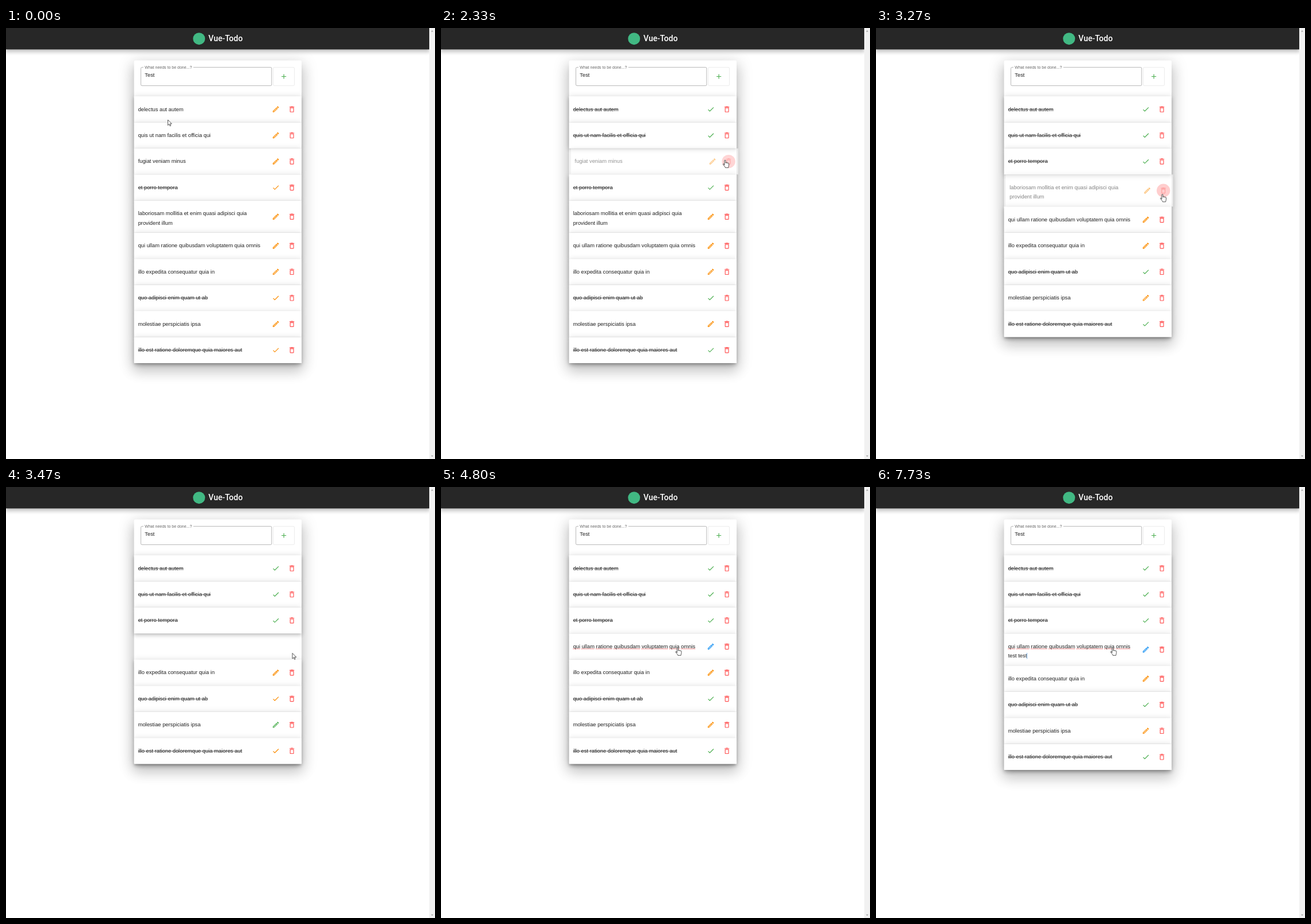
Recreate the animation shown at these times as an HTML page. Size 746 by 751 pixels, loop 8 s.

```html
<!DOCTYPE html>
<html lang="en">
<head>
<meta charset="utf-8">
<title>Vue-Todo</title>
<style>
html, body { margin: 0; width: 100%; height: 100%; overflow: hidden; background: #fff; }
#page {
  position: absolute; width: 1280px; height: 1289px; overflow: hidden;
  transform: scale(.58281); transform-origin: 0 0;
  font: 16px/28px Arial, "Liberation Sans", sans-serif; color: #212121;
}
#page * { box-sizing: border-box; }
main { position: absolute; width: 1263px; height: 100%; overflow: hidden; }
header {
  position: absolute; width: 100%; height: 64px; background: #272727;
  box-shadow: 0 5px 5px -3px #0003, 0 8px 10px 1px #00000024, 0 3px 14px 2px #0000001f;
}
header i { position: absolute; left: 558px; top: 14px; width: 36px; height: 36px; border-radius: 50%; background: #41b883; }
header b { position: absolute; left: 604px; top: 16px; font: 500 24px/32px Roboto, sans-serif; color: #fff; }
#card {
  position: absolute; left: 382px; top: 97px; width: 500px; padding-top: 107px;
  background: #fff; border-radius: 4px;
  box-shadow: 0 11px 15px -7px #0003, 0 24px 38px 3px #00000024, 0 9px 46px 8px #0000001f;
}
.field, .add { position: absolute; top: 20px; height: 56px; border-radius: 4px; }
.field { left: 20px; width: 391px; padding: 9px 11px; border: 1px solid #0000007a; }
.field label { position: absolute; left: 7px; top: -8px; padding: 0 4px; font-size: 12px; line-height: 16px; background: #fff; color: #0009; }
.add { left: 415px; width: 64px; padding: 15px 19px; border: 1px solid #ddd; fill: #4caf50; }
svg { display: block; }
.row {
  position: relative; min-height: 78px; padding: 25px 12px 15px; background: #fff;
  box-shadow: 0 3px 5px -1px #0003, 0 6px 10px #00000024, 0 1px 18px #0000001f;
}
.text { white-space: pre; }
.done { text-decoration: line-through; }
.text u { text-decoration: underline dotted 2px #f00b; text-underline-offset: 1px; text-decoration-skip-ink: none; }
.caret { display: inline-block; width: 1px; height: 18px; margin-right: -1px; vertical-align: -4px; background: #1976d2; }
.btn { position: absolute; top: 50%; width: 40px; height: 40px; margin-top: -20px; padding: 8px; border-radius: 50%; }
.state { left: 403px; }
.trash { left: 451px; fill: #ff5252; }
#bar { position: absolute; left: 1263px; width: 17px; height: 100%; background: #f1f1f1; }
#cursor { position: absolute; left: 0; top: 0; overflow: visible; fill: #fff; stroke: #111; stroke-width: 1.2; stroke-linejoin: round; }
</style>
</head>
<body>
<div id="page">
  <main>
    <div id="card">
      <div class="field"><label>What needs to be done...?</label><div style="margin-top:-1px">Test</div></div>
      <div class="add"><svg width="24" height="24"><path d="M19 13H13V19H11V13H5V11H11V5H13V11H19Z"/></svg></div>
      <div id="list"></div>
    </div>
    <header><i></i><b>Vue-Todo</b></header>
  </main>
  <svg id="bar" viewBox="0 0 17 1289" fill="#a3a3a3"><path d="M5 11H12L8.500 7ZM5 1278H12L8.500 1282Z"/></svg>
  <svg id="cursor" width="20" height="26"><path/></svg>
</div>
<script>
const LOOP = 8000, FPS = 15, SCALE = .58281;
const NEVER = Infinity;

const ICONS = {
  pencil: 'M14.06 9L15 9.94L5.92 19H5V18.08L14.06 9M17.66 3C17.41 3 17.15 3.1 16.96 3.29L15.13 5.12L18.88 8.87L20.71 7.04C21.1 6.65 21.1 6 20.71 5.63L18.37 3.29C18.17 3.09 17.92 3 17.66 3M14.06 6.19L3 17.25V21H6.75L17.81 9.94Z',
  check: 'M21 7L9 19L3.5 13.5L4.91 12.09L9 16.17L19.59 5.59Z',
  trash: 'M6 19A2 2 0 0 0 8 21H16A2 2 0 0 0 18 19V7H6V19M8 9H16V19H8V9M15.5 4L14.5 3H9.5L8.5 4H5V6H19V4Z'
};
const ARROW = 'M0 0V16.5L3.8 12.9L6.3 18.7L8.8 17.6L6.3 12H11.7Z';
const HAND = 'M-1.8 15V2.2a1.8 1.8 0 0 1 3.6 0V9a1.7 1.7 0 0 1 3.4 .4a1.6 1.6 0 0 1 3.2 .6a1.5 1.5 0 0 1 2.8 .9V16c0 3-1.5 4-1.5 7H.7C.7 20-3.8 17-5.8 13.5c-1-2 1.2-3 2.4-1.5Z';

const ORANGE = [251, 140, 0], GREEN = [76, 175, 80], BLUE = [33, 150, 243];
const INK = [33, 33, 33], HOVER_INK = [25, 95, 150];

const EDIT_AT = 4390, WRAP_AT = 5260;
const todos = [
  { text: 'delectus aut autem', doneAt: 400, hoverAt: 200 },
  { text: 'quis ut nam facilis et officia qui', doneAt: 1130, hoverAt: 700 },
  { text: 'fugiat veniam minus', goneAt: 2500 },
  { text: 'et porro tempora', doneAt: 0 },
  { text: 'laboriosam mollitia et enim quasi adipisci quia\nprovident illum', goneAt: 3460 },
  { text: 'qui ullam ratione quibusdam voluptatem quia omnis', editAt: EDIT_AT },
  { text: 'illo expedita consequatur quia in' },
  { text: 'quo adipisci enim quam ut ab', doneAt: 0 },
  { text: 'molestiae perspiciatis ipsa' },
  { text: 'illo est ratione doloremque quia maiores aut', doneAt: 0 }
].map(todo => ({ doneAt: NEVER, goneAt: NEVER, editAt: NEVER, hoverAt: NEVER, ...todo }));

const changes = [0, 400, 1130, 2500, 3460, EDIT_AT];
const removals = [{ index: 2, end: 2500 }, { index: 3, end: 3460 }];
const trashHovers = [{ index: 2, on: 1950, off: 2560 }, { index: 3, on: 2890, off: 3460 }];
const keyTimes = [6660, 6730, 6860, 6930, 7060, 7395, 7530, 7660, 7730];

// time, x, y of the pointer tip
const path = [
  [0, 281.5, 160], [250, 281, 146], [420, 281, 146], [800, 280, 185], [1270, 280, 185],
  [1930, 494, 230], [2530, 494, 230], [2800, 490, 293], [2930, 498, 289.5],
  [3750, 498, 289.5], [4250, 467, 278], [4530, 467, 278], [4800, 411.5, 280]
];
const handTimes = [[200, 480], [700, 1450], [1850, 2600], [2860, 3460], [4130, LOOP]];

const clamp = x => Math.max(0, Math.min(1, x));
const smooth = x => (x = clamp(x), x * x * (3 - 2 * x));
const lerp = (a, b, p) => a + (b - a) * p;
const mix = (a, b, p) => `rgb(${a.map((v, i) => Math.round(lerp(v, b[i], p)))})`;
const pulse = (t, on, off) => smooth((t - on) / 200) * (1 - smooth((t - off) / 200));
const within = (t, spans) => spans.some(([from, to]) => t >= from && t < to);

const list = document.getElementById('list');
const cursor = document.getElementById('cursor');
const icon = name => `<svg width="24" height="24"><path d="${ICONS[name]}"/></svg>`;

const rows = todos.map(() => {
  const el = document.createElement('div');
  el.className = 'row';
  el.innerHTML = `<div class="text"></div><div class="btn state">${icon('pencil')}</div><div class="btn trash">${icon('trash')}</div>`;
  list.append(el);
  const [text, state, trash] = el.children;
  return { el, text, state, trash, glyph: state.querySelector('path') };
});

const visible = t => todos.filter(todo => t < todo.goneAt);
const tint = (todo, t) => t >= todo.doneAt ? GREEN : t >= todo.editAt ? BLUE : ORANGE;

function editorHtml(text, t) {
  const words = text.split(' ').map((word, i) =>
    i === 0 && t >= WRAP_AT && t < 6320 ? word : `<u>${word}</u>`).join(' ');
  if (t < WRAP_AT) return words;
  const typed = 'test test'.slice(0, keyTimes.filter(k => t >= k).length);
  const caret = t < 5795 || t >= 6320 ? '<span class="caret"></span>' : '';
  return `${words}\n${typed}${caret}\u200b`;
}

function setHtml(el, html) {
  if (el.cached !== html) el.innerHTML = el.cached = html;
}

function drawRow(row, todo, before, index, t, changedAt) {
  row.el.style.display = todo ? '' : 'none';
  if (!todo) return;
  const done = t >= todo.doneAt;
  setHtml(row.text, t >= todo.editAt ? editorHtml(todo.text, t) : todo.text);
  row.text.classList.toggle('done', done);
  const hover = smooth((t - todo.hoverAt) / 200) * (1 - smooth((t - todo.doneAt) / 300));
  row.text.style.color = mix(INK, HOVER_INK, hover);

  row.glyph.setAttribute('d', done ? ICONS.check : ICONS.pencil);
  row.state.style.fill = mix(tint(before, changedAt - 1), tint(todo, t), smooth((t - changedAt) / 300));
  const editHover = t >= 4000 && index === 3 ? pulse(t, 4180, 4590) : 0;
  row.state.style.background = `rgba(33,150,243,${.25 * editHover})`;
  const glow = trashHovers.filter(h => h.index === index)
    .reduce((sum, h) => sum + pulse(t, h.on, h.off), 0);
  row.trash.style.background = `rgba(255,82,82,${.5 * glow})`;

  // a removed row slides out, then its successor slides in at the same place
  let away = 0;
  for (const { index: at, end } of removals) {
    if (at !== index) continue;
    if (t < end) away = Math.max(away, clamp((t - end + 500) / 500) ** 1.65);
    else away = Math.max(away, 1 - smooth((t - end) / 300));
  }
  row.el.style.opacity = 1 - away;
  row.el.style.transform = away ? `translateX(${10 * away}px)` : '';
}

function drawCursor(t) {
  const next = path.findIndex(p => p[0] > t);
  const b = path.at(next), a = next < 0 ? b : path[next - 1];
  const p = smooth((t - a[0]) / (b[0] - a[0] || 1));
  const x = lerp(a[1], b[1], p) / SCALE, y = lerp(a[2], b[2], p) / SCALE;
  cursor.style.transform = `translate(${x}px,${y}px)`;
  cursor.firstChild.setAttribute('d', within(t, handTimes) ? HAND : ARROW);
}

function draw(t) {
  const changedAt = changes.filter(c => c <= t).at(-1);
  const now = visible(t), before = visible(changedAt - 1);
  rows.forEach((row, i) => drawRow(row, now[i], before[i], i, t, changedAt));
  drawCursor(t);
}

let start;
function tick(time) {
  start ??= time;
  const frame = Math.floor((time - start) % LOOP * FPS / 1000 + .06);
  draw(frame * 1000 / FPS);
  requestAnimationFrame(tick);
}
draw(0);
requestAnimationFrame(tick);
</script>
</body>
</html>
```
